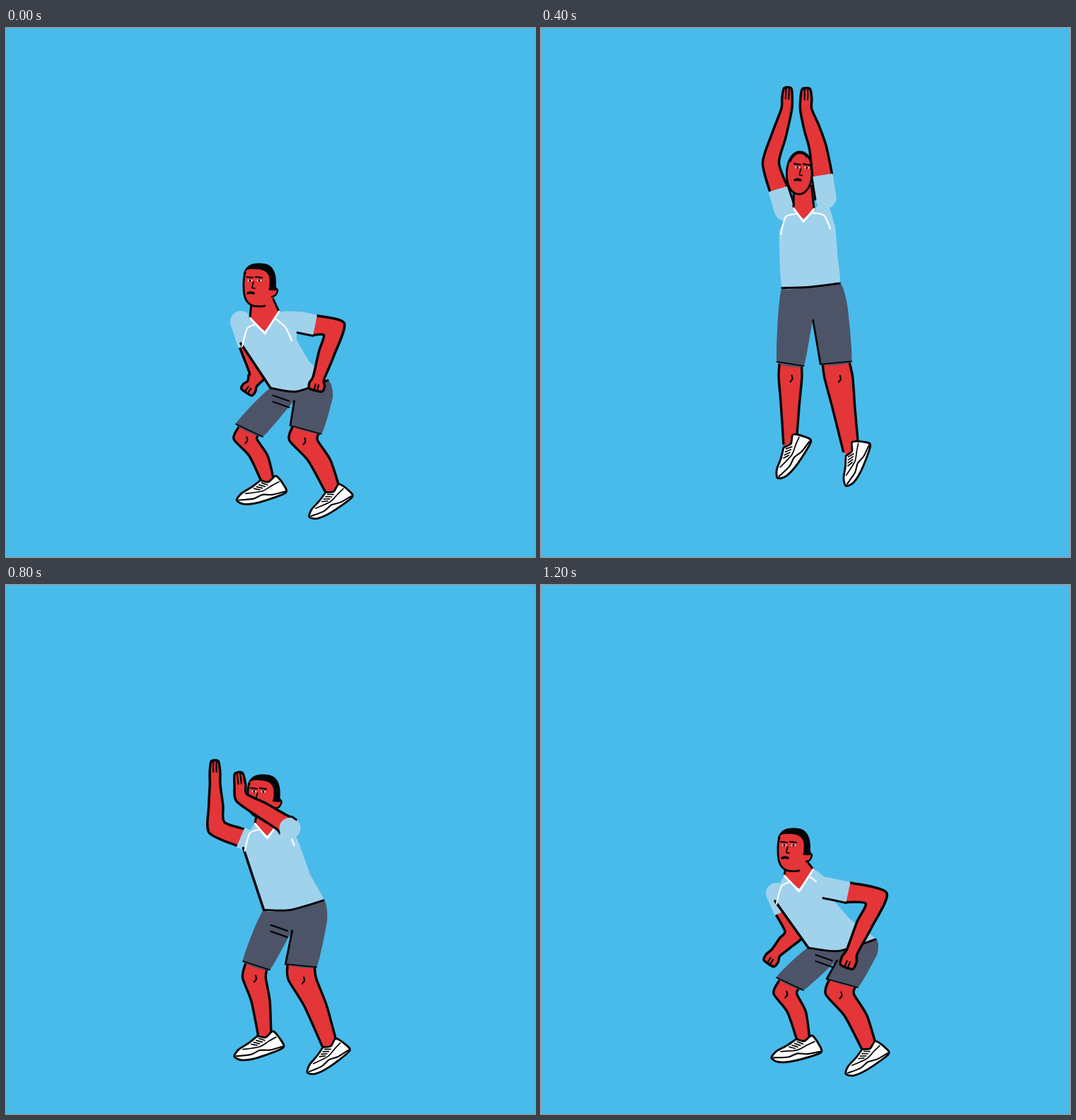
Recreate the animation shown at these times as an HTML page with a canvas. Size 748x748 px, loop 1280 ms.

```html
<!DOCTYPE html>
<html lang="en">
<head>
<meta charset="utf-8">
<title>Squat jump</title>
<style>
html, body { margin: 0; width: 100%; height: 100%; overflow: hidden; background: #48bbeb; }
canvas { display: block; width: 748px; height: 748px; }
</style>
</head>
<body>
<canvas id="stage" width="748" height="748"></canvas>
<script>
const ctx = document.getElementById('stage').getContext('2d');
const SKY = '#48bbeb', RED = '#e43538', SHIRT = '#a0d2ec', SHORTS = '#4d5468', INK = '#050507', WHITE = '#fff';
const STEP = 80, CUFF = 0.45;

// A pose is a set of joints. Arms: shoulder, elbow, wrist, fingertip. Legs: knee, ankle, foot angle.
const crouch = {
  head: [358, 365], tilt: 0, tip: [366, 432], waist: [[374, 509], [455, 498]],
  legL: [[344, 569], [370, 641], -8], legR: [[424, 568], [462, 655], -24],
  armL: [[332, 415], [356, 488], [348, 503], [340, 515]],
  armR: [[415, 416], [464, 426], [442, 495], [438, 512]]
};
const ready = {
  head: [367, 335], tilt: 0, tip: [367, 407], waist: [[361, 503], [449, 487]],
  legL: [[335, 572], [368, 641], -9], legR: [[417, 564], [459, 652], -23],
  armL: [[332, 405], [320, 460], [299, 435], [297, 413]],
  armR: [[410, 400], [407, 463], [350, 462], [333, 443]]
};
const takeoff = {
  head: [368, 252], tilt: 7, tip: [375, 320], waist: [[344, 411], [427, 404]],
  legL: [[352, 525], [361, 627], -36], legR: [[414, 528], [439, 639], -54],
  armL: [[352, 300], [310, 247], [342, 165], [343, 132]],
  armR: [[404, 296], [394, 223], [363, 163], [362, 135]]
};
const peak = {
  head: [364, 180], tilt: 0, tip: [369, 249], waist: [[339, 344], [420, 338]],
  legL: [[353, 448], [347, 567], -52], legR: [[419, 444], [438, 577], -60],
  armL: [[341, 235], [333, 160], [350, 88], [352, 60]],
  armR: [[402, 210], [390, 140], [381, 90], [382, 60]]
};
const landing = {
  head: [367, 259], tilt: 2, tip: [374, 325], waist: [[348, 422], [432, 408]],
  legL: [[354, 521], [361, 635], -13], legR: [[415, 514], [454, 649], -29],
  armL: [[340, 303], [315, 236], [322, 160], [320, 131]],
  armR: [[402, 295], [379, 222], [349, 158], [346, 131]]
};
const absorb = {
  head: [361, 334], tilt: 0, tip: [366, 385], waist: [[378, 490], [463, 477]],
  legL: [[354, 552], [370, 642], -6], legR: [[419, 558], [461, 654], -24],
  armL: [[375, 422], [284, 430], [274, 382], [275, 346]],
  armR: [[401, 384], [397, 427], [320, 417], [315, 377]]
};
const swing = {
  head: [357, 376], tilt: 0, tip: [365, 433], waist: [[378, 513], [473, 501]],
  legL: [[352, 564], [371, 644], -5], legR: [[426, 563], [464, 655], -24],
  armL: [[333, 436], [358, 492], [332, 520], [322, 535]],
  armR: [[402, 428], [474, 443], [440, 518], [432, 540]]
};

// One row per step: pose, next pose, share of the next one, lift.
const steps = [
  [crouch], [crouch, ready, 0.5], [ready], [ready, takeoff, 0.45],
  [takeoff], [takeoff, peak, 0.65], [peak, peak, 0, -4], [peak],
  [peak, landing, 0.38], [landing], [landing, absorb, 0.55], [absorb],
  [absorb, swing, 0.3], [absorb, swing, 0.55], [absorb, swing, 0.8], [swing]
];

const lerp = (a, b, t) => a + (b - a) * t;
const between = (a, b, t) => [lerp(a[0], b[0], t), lerp(a[1], b[1], t)];
const shift = (p, x, y) => [p[0] + x, p[1] + y];

function mix(a, b, t) {
  if (typeof a === 'number') return lerp(a, b, t);
  if (Array.isArray(a)) return a.map((v, i) => mix(v, b[i], t));
  return Object.fromEntries(Object.keys(a).map(key => [key, mix(a[key], b[key], t)]));
}

function normal(a, b) {
  const dx = b[0] - a[0], dy = b[1] - a[1], len = Math.hypot(dx, dy) || 1;
  return [-dy / len, dx / len];
}

function trace(p, closed, k) {
  const n = p.length;
  const get = i => p[closed ? (i + n) % n : Math.max(0, Math.min(n - 1, i))];
  ctx.beginPath();
  ctx.moveTo(...p[0]);
  for (let i = 0; i < (closed ? n : n - 1); i++) {
    const [a, b, c, d] = [get(i - 1), get(i), get(i + 1), get(i + 2)];
    ctx.bezierCurveTo(
      b[0] + (c[0] - a[0]) * k, b[1] + (c[1] - a[1]) * k,
      c[0] - (d[0] - b[0]) * k, c[1] - (d[1] - b[1]) * k, ...c);
  }
}

function fill(p, color, k = 0.13) {
  trace(p, true, k);
  ctx.fillStyle = color;
  ctx.fill();
}

function line(p, width = 3, color = INK, k = 0.13) {
  trace(p, false, k);
  ctx.lineWidth = width;
  ctx.strokeStyle = color;
  ctx.stroke();
}

function dot([x, y], r, color) {
  ctx.beginPath();
  ctx.arc(x, y, r, 0, 7);
  ctx.fillStyle = color;
  ctx.fill();
}

function place([x, y], angle, scale, draw) {
  ctx.save();
  ctx.translate(x, y);
  ctx.rotate(angle * Math.PI / 180);
  ctx.scale(scale, scale);
  draw();
  ctx.restore();
}

// Both edges of a limb that runs along the points with the given half widths.
function edges(points, widths) {
  const last = points.length - 1;
  const side = sign => points.map((p, i) => {
    const a = normal(points[Math.max(0, i - 1)], points[Math.max(1, i)]);
    const b = normal(points[Math.min(i, last - 1)], points[Math.min(i + 1, last)]);
    const sum = [a[0] + b[0], a[1] + b[1]], len = Math.hypot(...sum) || 1;
    const reach = sign * widths[i] * Math.min(1.4, 2 / len) / len;
    return shift(p, sum[0] * reach, sum[1] * reach);
  });
  return [side(1), side(-1)];
}

function arm([shoulder, elbow, wrist, tip], size) {
  const fist = wrist[1] > elbow[1] + 5;
  const points = [
    between(shoulder, elbow, CUFF), elbow, between(elbow, wrist, 0.5),
    wrist, between(wrist, tip, 0.5), tip];
  const hand = fist ? [11, 9] : [8, 5.5];
  const [a, b] = edges(points, [14, 12, 11, 8, ...hand].map(w => w * size));
  const outline = [...a, ...b.reverse()];
  fill(outline, RED);
  line(outline, 3.5);
  const [nx, ny] = normal(wrist, tip), len = fist ? 8 : 15;
  for (const s of [-2.2, 2.2]) {
    const top = shift(tip, nx * s, ny * s);
    line([top, shift(top, -ny * len, nx * len)], 2.2);
  }
}

function sleeve([shoulder, elbow], inkSide) {
  const cuff = between(shoulder, elbow, CUFF);
  const [a, b] = edges([shoulder, cuff], [15, 15]);
  dot(shoulder, 15, SHIRT);
  fill([...a, ...b.reverse()], SHIRT, 0);
  if (inkSide) line(inkSide > 0 ? a : b, 3);
}

function leg([hem, ankle], size, bend) {
  const rows = [[0, 0, 19], [0.17, -10, 20], [0.5, 0, 16], [1, 0, 11]];
  const side = sign => rows.map(([t, bow, w]) =>
    shift(between(hem, ankle, t), bow * bend + sign * w * size, t ? 0 : sign * 4 * bend));
  const outer = side(-1), inner = side(1);
  fill([...outer, ...[...inner].reverse()], RED);
  line(outer, 3.4);
  line(inner, 3.4);
  const [x, y] = between(outer[1], inner[1], 0.5);
  line([[x + 2, y - 3], [x + 3, y + 2], [x, y + 6]], 2.2);
}

function shoe() {
  const body = [[-10, -3], [1, 1], [13, -6], [22, 8], [23, 20], [-14, 28], [-38, 28], [-48, 21], [-40, 12], [-24, 5]];
  fill(body, WHITE);
  line([...body, body[0]], 3);
  line([[22, 18], [4, 20], [-10, 18], [-24, 22], [-45, 21]], 2.2);
  line([[16, 3], [5, 7], [-10, 13], [-34, 13]], 1.8);
  for (let i = 0; i < 4; i++) line([[-9 - i * 4, 1 + i * 2.2], [-1 - i * 4, 5 + i * 1.8]], 1.8);
}

function shorts(p, bend) {
  const [left, right] = p.waist;
  const hem = (c, w, tilt) => [-1, 1].map(s => shift(c, s * w, s * tilt));
  const [lo, li] = hem(p.legL[0], 19, 3 + 6 * bend);
  const [ri, ro] = hem(p.legR[0], 22, -2 + 8 * bend);
  const crotch = shift(between(left, right, 0.5), 3 - 10 * bend, 49 - 25 * bend);
  const hip = shift(between(right, ro, 0.3), 6 + 4 * bend, 0);
  fill([left, right, hip, ro, ri, crotch, li, lo], SHORTS, 0.06);
  line([lo, li], 1.8);
  line([ri, ro], 1.8);
  line([crotch, ri], 2.8);
  if (bend > 0.5) {
    for (const y of [-5, 4]) line([shift(crotch, -30, y - 3), shift(crotch, -7, y + 5)], 2.2);
  }
}

function shirt(p, bend, collarL, collarR) {
  const { tip, waist: [left, right] } = p, low = bend > 0.5;
  const pitL = shift(tip, -34, 14), pitR = shift(tip, 45, 8);
  const hemLine = [left, shift(between(left, right, 0.45), 0, 2 + 8 * bend), right];
  const sideR = shift(between(pitR, right, 0.55), -6 * bend, 0);
  const topR = shift(p.armR[0], 0, -14 * bend);
  fill([collarL, pitL, ...hemLine, sideR, pitR, topR, collarR], SHIRT, 0.06);
  line(hemLine, 3);
  if (low) line([pitL, left], 3.6);
  else line(edges([p.armL[0], between(p.armL[0], p.armL[1], CUFF)], [15, 14])[0], 3);
}

function collar(p, bend, collarL, collarR) {
  const { head, tip } = p;
  const jawL = shift(head, -8 - 3 * bend, 24), jawR = shift(head, 17, 18 - 6 * bend);
  const neckL = [Math.max(collarL[0], jawL[0] - 3), collarL[1]];
  fill([jawL, neckL, shift(tip, 0, -4), collarR, jawR], RED, 0.04);
  line([jawL, neckL]);
  line([jawR, collarR]);
  line([collarL, tip, collarR], 2.8, WHITE, 0);
  line([between(tip, collarL, 0.6), shift(tip, -25, -7), shift(tip, -32, 18)], 2.2, WHITE);
  line([between(tip, collarR, 0.7), shift(tip, 29, -9), shift(tip, 38, 10)], 2.2, WHITE);
}

// Points on a rounded box, from one angle to another in degrees.
function oval(rx, ry, power, from, to) {
  const round = v => Math.sign(v) * Math.abs(v) ** (2 / power);
  return Array.from({ length: 25 }, (_, i) => {
    const a = lerp(from, to, i / 24) * Math.PI / 180;
    return [rx * round(Math.cos(a)), ry * round(Math.sin(a)) - 2 * (power - 2)];
  });
}

function head(bend) {
  const low = bend > 0.5, rx = low ? 22 : 18, power = low ? 2.7 : 2.1;
  const eyeX = low ? -13 : -3, mouthX = low ? -12 : -2;
  fill(oval(rx, 30, power, 0, 360), RED);
  line(oval(rx, 30, power, low ? 75 : 0, low ? 210 : 360), 2.8);
  if (low) {
    dot([20, 7], 6, RED);
    line([[22, 1], [26, 6], [23, 13], [18, 15]], 2.5);
    const outer = oval(24, 31, power, 205, 368);
    const inner = oval(23, 30, power, 205, 368).map(([x, y], i) => [x - 9 * i / 24, y + 8 * Math.sin(i / 24 * Math.PI)]);
    fill([...outer, ...inner.reverse()], INK);
  } else {
    line(oval(17, 29, power, 215, 305), 4);
  }
  for (const x of [eyeX, eyeX + 13]) {
    line([[x - 5, -13], [x + 4, -12]], 2.2);
    line([[x - 2, -8], [x + 2, -8]], 2.4, WHITE);
    dot([x, -8], 1.7, INK);
  }
  line([[eyeX + 5, -6], [eyeX + 3, 2], [eyeX + 7, 3]], 1.8);
  line([[mouthX - 4, 10], [mouthX, 9], [mouthX + 4, 10]], 3.6);
}

function figure(p) {
  // How far the knees are bent, from the height of the waist over the feet
  const waistY = (p.waist[0][1] + p.waist[1][1]) / 2;
  const bend = Math.max(0, Math.min(1, (222 - p.legL[1][1] + waistY) / 70));
  const low = bend > 0.5;
  const collarL = shift(p.tip, -14 - 7 * bend, -19 - 3 * bend);
  const collarR = shift(p.tip, 15 + 5 * bend, -18 - 13 * bend);

  arm(p.armL, 0.92);
  sleeve(p.armL);
  leg(p.legL, 0.82, bend);
  leg(p.legR, 1, bend);
  place(p.legL[1], p.legL[2], 0.98, shoe);
  place(p.legR[1], p.legR[2], 0.94, shoe);
  shorts(p, bend);
  shirt(p, bend, collarL, collarR);
  collar(p, bend, collarL, collarR);
  place(p.head, p.tilt, 1, () => head(bend));
  arm(p.armR, 1);
  sleeve(p.armR, low ? 1 : -1);
}

function draw(time) {
  const [a, b = a, t = 0, lift = 0] = steps[Math.floor(time / STEP) % steps.length];
  ctx.fillStyle = SKY;
  ctx.fillRect(0, 0, 748, 748);
  ctx.lineCap = ctx.lineJoin = 'round';
  place([0, lift], 0, 1, () => figure(mix(a, b, t)));
}

const start = performance.now();
function tick() {
  draw(performance.now() - start);
  requestAnimationFrame(tick);
}
tick();
</script>
</body>
</html>
```
